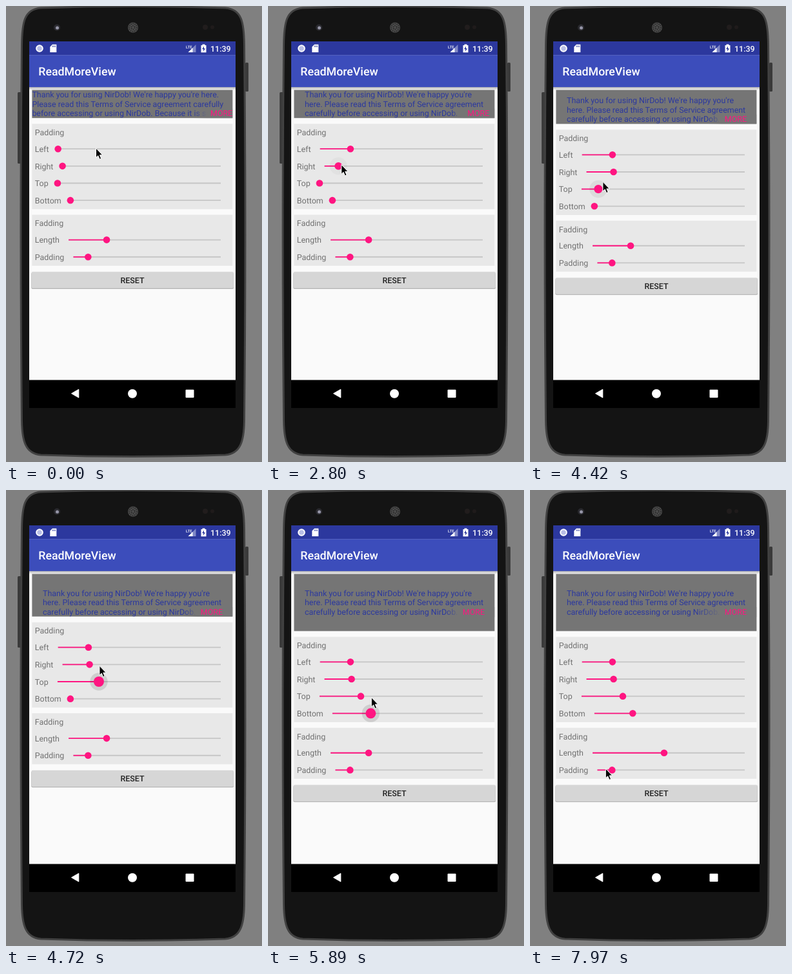
Animation of 397x709 px, one loop 8 s. Source, as an HTML page:

```html
<!DOCTYPE html>
<html lang="en">
<head>
<meta charset="utf-8">
<title>ReadMoreView</title>
<style>
  html, body { margin: 0; width: 100%; height: 100%; overflow: hidden; background: #808080; }
  svg { display: block; width: 397px; height: 709px; }
  text { font: 12.44px Roboto, "Noto Sans", sans-serif; fill: #717171; white-space: pre; text-rendering: geometricPrecision; }
  .medium { font-weight: 500; }
  .body { fill: #2b389f; }
  .accent { fill: #ff1581; }
  .panel { fill: #e8e8e8; }
  .track { stroke: #c6c6c6; stroke-width: 1.8; }
  .value { stroke: #ff1581; stroke-width: 1.8; }
</style>
</head>
<body>
<svg viewBox="0 0 397 709">
  <defs>
    <linearGradient id="drop" x2="0" y2="1">
      <stop stop-color="#000" stop-opacity=".28"/>
      <stop offset="1" stop-color="#000" stop-opacity="0"/>
    </linearGradient>
    <linearGradient id="fade" gradientUnits="userSpaceOnUse" y1="0" y2="0">
      <stop stop-color="#757575" stop-opacity="0"/>
      <stop offset="1" stop-color="#757575"/>
    </linearGradient>
    <clipPath id="boxClip"><rect id="clipRect" x="40.4" y="130.5" width="311"/></clipPath>
  </defs>
  <rect width="397" height="709" fill="#808080"/>

  <!-- phone -->
  <rect x="18" y="134" width="6" height="111" rx="1.5" fill="#3a3a3a"/>
  <rect x="371" y="88" width="5" height="45" rx="1.5" fill="#3a3a3a"/>
  <path d="M24.5 60C25 26 28 5 54 3Q197-2 340 3C366 5 369 26 369.5 60Q372.500 350 369.500 645C369 676 364 696 340 698Q197 703 54 698C30 696 25 676 24.500 645Q21.500 350 24.500 60Z" fill="#141414" stroke="#414141" stroke-width="3"/>
  <circle cx="79" cy="33.5" r="5" fill="#2b2b30"/>
  <circle cx="79.5" cy="34" r="2.5" fill="#9696a8"/>
  <circle cx="197" cy="33.5" r="8" fill="#4a4a4a"/>
  <g fill="none" stroke="#222" stroke-width="1.5" stroke-dasharray="1.5">
    <circle cx="197" cy="33.5" r="6"/>
    <circle cx="197" cy="33.5" r="2.8"/>
  </g>
  <circle cx="309" cy="33" r="4" fill="#211d1d"/>
  <circle cx="320" cy="33" r="3" fill="#1f1b1b"/>

  <!-- screen -->
  <rect x="36" y="55" width="320" height="570" fill="#fafafa"/>
  <rect x="36" y="126" width="320" height="5" fill="url(#drop)"/>
  <rect x="36" y="55" width="320" height="21.5" fill="#2c389e"/>
  <rect x="36" y="76.3" width="320" height="49.8" fill="#3c4dbb"/>
  <text class="medium" x="50.3" y="108" style="font-size:17.78px;fill:#fff">ReadMoreView</text>
  <circle cx="52" cy="66" r="4.8" fill="#b9bfe6" stroke="#fff" stroke-width="2"/>
  <path d="M72 59.8h6.3v12.2h-10v-8.4z" fill="#fff"/>
  <path d="M72.3 61.5v2.4m2-2.4v2.4m2-2.4v2.4" stroke="#2c389e" stroke-width=".9"/>
  <text class="medium" x="279" y="65.5" style="font-size:6px;fill:#fff">LTE</text>
  <path d="M294.5 60v12h-12z" fill="#8088c6"/>
  <path d="M289.5 65v7h-7z" fill="#fff"/>
  <path d="M302.5 61h2v-1.4h4V61h2v11.3h-8z" fill="#fff"/>
  <path d="M307 62.5l-2.8 4.6h1.9v3.7l2.8-4.8H307z" fill="#2c389e"/>
  <text class="medium" x="317" y="70.5" style="fill:#fff">11:39</text>
  <rect x="36" y="581.5" width="320" height="43.5"/>
  <path d="M101.5 602.5L112.800 596v13z" fill="#fff" stroke="#fff" stroke-linejoin="round"/>
  <circle cx="196" cy="602.7" r="7" fill="#fff"/>
  <rect x="278.5" y="596.5" width="13" height="12.5" rx="1" fill="#fff"/>

  <!-- collapsible text -->
  <rect id="box" x="40.4" y="130.5" width="311" fill="#757575"/>
  <g clip-path="url(#boxClip)">
    <g id="copy">
      <text class="body" y="142.1"></text>
      <text class="body" y="156.7"></text>
      <text class="body" y="171.2"></text>
      <rect id="veil" y="159.6" height="15.6" fill="url(#fade)"/>
      <text id="more" class="accent" y="171.2" text-anchor="end">MORE</text>
    </g>
  </g>

  <!-- controls -->
  <g id="controls">
    <rect x="39.3" y="414.5" width="313.8" height="25.6" rx="2" fill="#b4b4b4"/>
    <rect x="39.5" y="413.3" width="313.4" height="25.5" rx="2" fill="#d6d6d6"/>
    <text class="medium" x="196" y="430.6" text-anchor="middle" style="fill:#222">RESET</text>
  </g>
  <path id="cursor" d="M0 0V14.8L3.300 11.700L5.700 17.300L8.200 16.200L5.900 10.800H10.300Z" stroke="#fff"/>
</svg>

<script>
const LOOP = 8000, STEP = 147.5;      // the picture refreshes once per STEP
const LEFT = 40.4, WIDTH = 311, ROW = 26.65, TRACK_END = 333, MAX = 88.9;
const COPY = "Thank you for using NirDob! We're happy you're here. Please read this " +
  "Terms of Service agreement carefully before accessing or using NirDob. Because it is such";

const $ = id => document.getElementById(id);
const clamp = v => Math.max(0, Math.min(1, v));
const mix = (a, b, p) => a + (b - a) * p;
const smooth = p => p * p * (3 - 2 * p);

function set(el, attrs) {
  for (const k in attrs) el.setAttribute(k, attrs[k]);
}

function add(tag, attrs) {
  const el = document.createElementNS("http://www.w3.org/2000/svg", tag);
  set(el, attrs);
  return $("controls").appendChild(el);
}

function addText(y, label) {
  const el = add("text", { x: 44.8, y });
  el.textContent = label;
  return el;
}

function slider(label, y, value) {
  const start = 59 + addText(y + 4.7, label).getComputedTextLength();
  add("line", { class: "track", x1: start, x2: TRACK_END, y1: y, y2: y });
  return {
    y, value,
    xAt: v => mix(start, TRACK_END, v),
    bar: add("line", { class: "value", x1: start, y1: y, y2: y }),
    halo: add("circle", { cy: y, r: 13.7 }),
    thumb: add("circle", { class: "accent", cy: y })
  };
}

function panel(title, top, rows) {
  add("rect", { class: "panel", x: LEFT, y: top, width: WIDTH, height: ROW * (rows.length + 1) - .6 });
  addText(top + 17.8, title);
  return rows.map(([label, value], i) => slider(label, top + 39 + ROW * i, value));
}

const [left, right, top_, bottom, length, gap] = [
  ...panel("Padding", 183.2, [["Left", 0], ["Right", 0], ["Top", 0], ["Bottom", 0]]),
  ...panel("Fadding", 324.6, [["Length", .25], ["Padding", .1]])
];
const sliders = [left, right, top_, bottom, length, gap];

// times in steps: the pointer arrives, grabs, and lets go at a new value
const drags = [
  { on: left, arrive: 8, grab: 8, drop: 10, to: .187 },
  { on: right, arrive: 16, grab: 17.5, drop: 20, to: .171 },
  { on: top_, arrive: 28, grab: 28, drop: 32, to: .253 },
  { on: bottom, arrive: 35, grab: 36, drop: 40, to: .255 },
  { on: length, arrive: 46, grab: 47, drop: 50, to: .47 }
];
for (const d of drags) d.on.drag = d;

const progress = (d, s) => clamp((s - d.grab) / (d.drop - d.grab));

// the thumb trails the pointer a little
function valueAt({ value, drag }, s) {
  return drag ? mix(value, drag.to, progress(drag, s) ** 1.3) : value;
}

function pressAt({ drag }, s) {
  return drag && s < drag.drop + 1 ? clamp((s - drag.grab - 1) / 2) : 0;
}

const growth = s => MAX * (valueAt(top_, s) + valueAt(bottom, s));

function pointerAt(s) {
  let x = 139.5, y = 221, leave = 0;
  const stops = [...drags, { on: gap, arrive: 54, grab: 54, drop: 55, to: .1, dx: -10 }];
  for (const { on, arrive, grab, drop, to, dx = 1 } of stops) {
    if (s < leave) break;
    const p = smooth(clamp((s - leave) / (arrive - leave)));
    x = mix(x, on.xAt(on.value) + dx, p);
    y = mix(y, on.y + growth(grab) - 2.2, p);
    if (s < arrive) break;
    x += (on.xAt(to) - on.xAt(on.value)) * progress({ grab, drop }, s);
    leave = drop + 1;
  }
  return [x, y];
}

const ruler = document.createElement("canvas").getContext("2d");
ruler.font = "12.44px Roboto, 'Noto Sans', sans-serif";

function wrap(width) {
  const lines = [""];
  for (const word of COPY.split(" ")) {
    const last = lines.length - 1, joined = lines[last] ? lines[last] + " " + word : word;
    if (ruler.measureText(joined).width <= width) lines[last] = joined;
    else lines.push(word);
  }
  return lines;
}

const bodyLines = document.querySelectorAll(".body");

function draw(time) {
  const s = Math.floor((time % LOOP + 12) / STEP);
  for (const item of sliders) {
    const x = item.xAt(valueAt(item, s)), press = pressAt(item, s);
    set(item.bar, { x2: x });
    set(item.halo, { cx: x, opacity: .11 * press });
    set(item.thumb, { cx: x, r: 5.3 + 2.7 * press });
  }
  const px = item => MAX * valueAt(item, s);
  const edge = LEFT + WIDTH - px(right);
  const fadeEnd = edge - 34 - .55 * px(gap), fadeStart = fadeEnd - px(length);

  const lines = wrap(WIDTH - px(left) - px(right));
  bodyLines.forEach((el, i) => {
    set(el, { x: LEFT + px(left) });
    if (el.textContent !== lines[i]) el.textContent = lines[i];
  });
  const height = 43.7 + growth(s);
  set($("box"), { height });
  set($("clipRect"), { height });
  set($("copy"), { transform: `translate(0 ${px(top_)})` });
  set($("fade"), { x1: fadeStart, x2: fadeEnd });
  set($("veil"), { x: fadeStart, width: LEFT + WIDTH - fadeStart });
  set($("more"), { x: edge - .2 });
  set($("controls"), { transform: `translate(0 ${growth(s)})` });
  set($("cursor"), { transform: `translate(${pointerAt(s)})` });
}

const begin = performance.now();
function tick() {
  draw(performance.now() - begin);
  requestAnimationFrame(tick);
}
tick();
</script>
</body>
</html>
```
